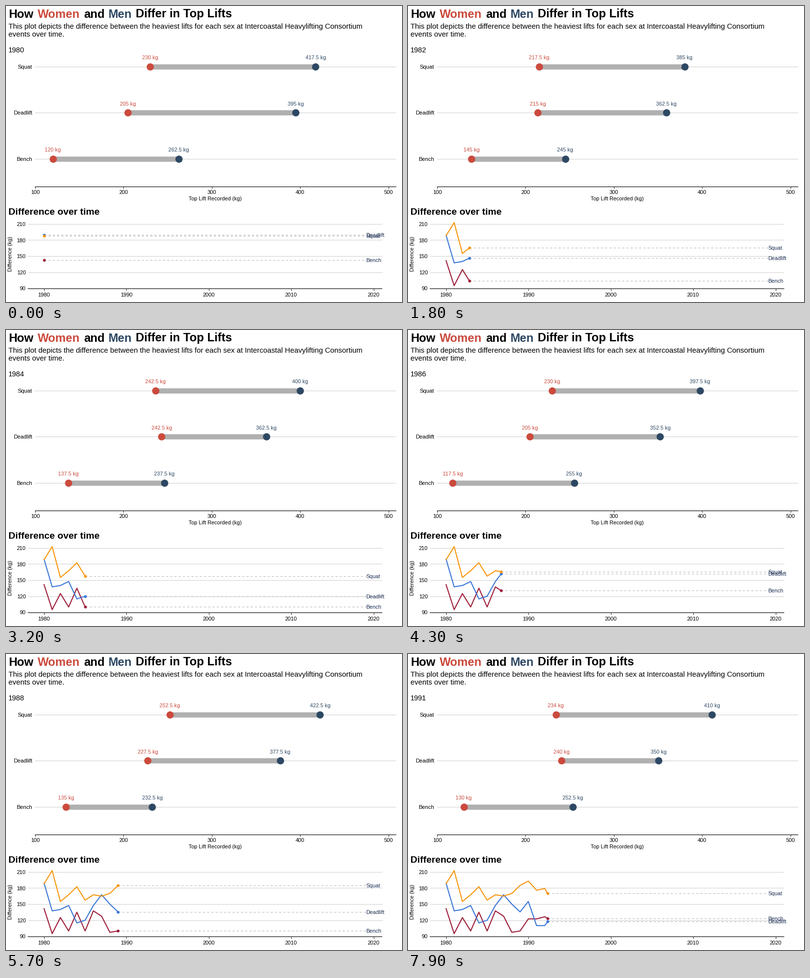
A matplotlib script for the animation above (8000 ms loop, 800 px wide and 600 px high).

```python
import matplotlib.pyplot as plt
import numpy as np
from matplotlib.animation import FuncAnimation

W, H, DPI = 800, 600, 100
FRAMES, INTERVAL = 80, 100
PT = 72 / DPI  # points per pixel

RED, NAVY, INK = "#cb4a3d", "#2d4863", "#1c2e52"
BAR, GRID, DASH = "#b0b0b0", "#d3d3d3", "#b4b4b4"

# Top lifts in kg by year from 1980: women, men
LIFTS = {
    "Bench": (
        [120, 147.5, 120, 145, 137.5, 137.5, 117.5, 125, 135, 132.5, 127.5, 130, 130, 130],
        [262.5, 242.5, 245, 245, 272.5, 237.5, 255, 252.5, 232.5, 232.5, 250, 252.5, 256.5, 248],
    ),
    "Deadlift": (
        [205, 230, 210, 215, 245, 242.5, 205, 237.5, 227.5, 227.5, 230, 240, 242.5, 240],
        [395, 367.5, 350, 362.5, 360, 362.5, 352.5, 405, 377.5, 363, 385, 350, 352.5, 372.5],
    ),
    "Squat": (
        [230, 215, 210, 217.5, 217.5, 242.5, 230, 257.5, 252.5, 240, 220, 234, 235, 250],
        [417.5, 427.5, 365, 385, 400, 400, 397.5, 422.5, 422.5, 425, 413, 410, 414, 402],
    ),
}
ROWS = {"Squat": 122.8, "Deadlift": 216.1, "Bench": 309.6}
COLORS = {"Bench": "#9f1f3b", "Deadlift": "#3c78d8", "Squat": "#f9970f"}

YEARS = np.arange(14)
REVEAL = np.round(249 * YEARS / 39)  # step at which each year is reached
HOLD, MOVE = 4, 3                    # still steps and in-between steps per year

plt.rcParams["font.family"] = "Liberation Sans"
fig = plt.figure(figsize=(W / DPI, H / DPI), dpi=DPI, facecolor="white")
ax = fig.add_axes([0, 0, 1, 1])
ax.set(xlim=(0, W), ylim=(H, 0))
ax.axis("off")


def kg_x(kg):
    return 59 + (kg - 100) * 1.784


def year_x(year):
    return 76.6 + year * 16.65


def diff_y(diff):
    return 572.3 - (diff - 90) * 1.0875


def text(x, y, s, size=10.8, color="black", **kw):
    return ax.text(x, y, s, fontsize=size * PT, color=color, va="baseline", **kw)


def line(x, y, color, width, **kw):
    kw.setdefault("solid_capstyle", "butt")
    return ax.plot(x, y, color=color, lw=width * PT, **kw)[0]


def dot(color, radius, z):
    return ax.plot([], [], "o", color=color, ms=2 * radius * PT, mew=0, zorder=z)[0]


def draw_static():
    for x, word, color in [(5, "How", "black"), (63.5, "Women", RED), (157, "and", "black"),
                           (206, "Men", NAVY), (262, "Differ in Top Lifts", "black")]:
        text(x, 23.5, word, 23.8, color, weight="bold")
    text(5, 46.3, "This plot depicts the difference between the heaviest lifts for each sex "
         "at Intercoastal Heavylifting Consortium", 14.8)
    text(5, 62.3, "events over time.", 14.8)

    for name, y in ROWS.items():
        line([58, 788], [y, y], GRID, 1.1, zorder=1)
        text(53, y + 4.3, name, 11.1, ha="right")
    line([57.5, 788], [365.5, 365.5], "black", 1.1)
    for kg in range(100, 501, 100):
        line([kg_x(kg)] * 2, [365.5, 369.5], "#333333", 1.1)
        text(kg_x(kg), 381.3, str(kg), 11, ha="center")
    text(422.7, 394.3, "Top Lift Recorded (kg)", 10.7, ha="center")

    text(5, 423.3, "Difference over time", 19.2, weight="bold")
    for diff in range(90, 211, 30):
        y = diff_y(diff)
        line([44, 760], [y, y], GRID, 1.1, zorder=1)
        text(40, y + 4.1, str(diff), 11, ha="right")
    line([44, 760], [572.8, 572.8], "#444444", 1.5)
    for year in range(0, 41, 10):
        line([year_x(year)] * 2, [573, 577], "#333333", 1.1)
        text(year_x(year), 589.3, str(1980 + year), 11, ha="center")
    ax.text(14, 502.5, "Difference (kg)", fontsize=10.8 * PT, rotation=90,
            ha="right", va="center")


class Dumbbell:
    def __init__(self, name):
        self.data = LIFTS[name]
        self.y = ROWS[name]
        self.bar = line([], [], BAR, 10.5, zorder=3)
        self.ends = [(dot(c, 7.3, 4), text(0, self.y - 14.6, "", 10.8, c, ha="center", zorder=5))
                     for c in (RED, NAVY)]

    def update(self, n, p):
        xs = []
        for (mark, label), vals in zip(self.ends, self.data):
            x = kg_x(vals[n] + (vals[n + 1] - vals[n]) * p)
            mark.set_data([x], [self.y])
            label.set_x(x)
            label.set_text(f"{vals[n if p < 0.5 else n + 1]:g} kg")
            xs.append(x)
        self.bar.set_data(xs, [self.y] * 2)


class Trace:
    def __init__(self, name):
        women, men = map(np.array, LIFTS[name])
        self.diff = men - women
        self.dash = line([], [], DASH, 1.07, linestyle=(0, (4, 4)), dash_capstyle="butt", zorder=2)
        self.path = line([], [], COLORS[name], 2.1, solid_joinstyle="round", zorder=3)
        self.mark = dot(COLORS[name], 2.9, 4)
        self.label = text(727.5, 0, name, 10.9, INK, zorder=5)

    def update(self, t):
        seen = YEARS < t
        xs = year_x(np.append(YEARS[seen], t))
        ys = diff_y(np.append(self.diff[seen], np.interp(t, YEARS, self.diff)))
        self.path.set_data(xs, ys)
        self.mark.set_data(xs[-1:], ys[-1:])
        self.dash.set_data([xs[-1], 727.5], [ys[-1]] * 2)
        self.label.set_y(ys[-1] + 4)


draw_static()
year_label = text(5, 94.3, "", 14.5)
dumbbells = [Dumbbell(name) for name in ROWS]
traces = [Trace(name) for name in LIFTS]


def update(k):
    # The first hold starts halfway through
    n, step = divmod(k + HOLD // 2, HOLD + MOVE)
    p = max(0, step - HOLD + 1) / (MOVE + 1)
    year_label.set_text(str(1980 + n))
    for d in dumbbells:
        d.update(n, p)
    t = np.interp(k, REVEAL, YEARS)
    for tr in traces:
        tr.update(t)
    return []


anim = FuncAnimation(fig, update, frames=FRAMES, interval=INTERVAL, repeat=True, repeat_delay=0)
plt.show()
```
